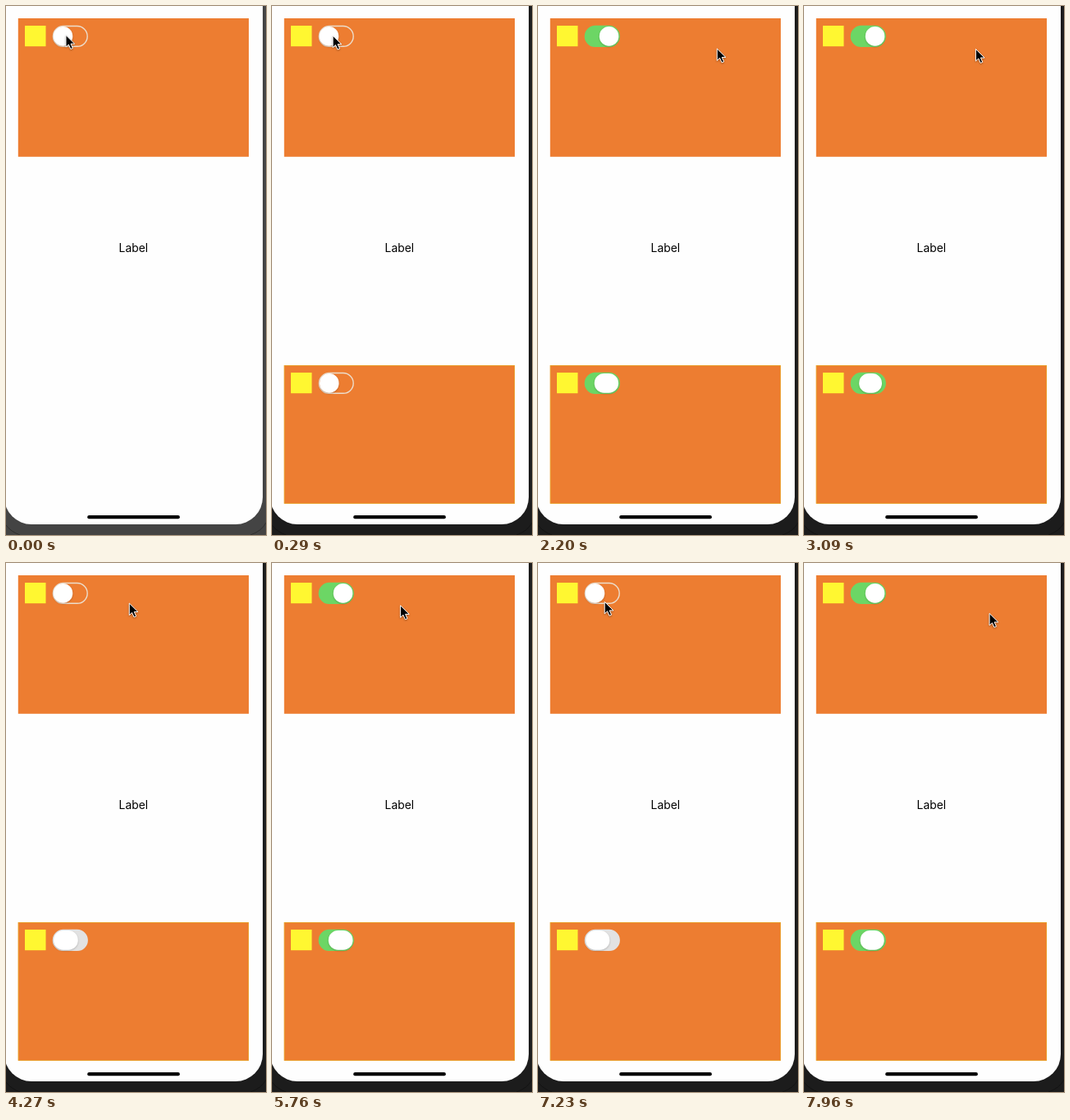
These frames come from a looping animation (317x645 px, 8 s). An HTML page:

```html
<!DOCTYPE html>
<html lang="en">
<head>
<meta charset="utf-8">
<title>Mirrored switch</title>
<style>
  html, body { margin: 0; width: 100%; height: 100%; overflow: hidden; background: #fff; }
  svg { display: block; width: 317px; height: 645px; }
  text { font: 13.9px Inter, sans-serif; text-anchor: middle; }
  .track { stroke-width: 1.4; }
  .thumb { fill: #fff; filter: drop-shadow(0 1px 1px #0003); }
  #cursor { filter: drop-shadow(0 1px 1px #0005); }
</style>
</head>
<body>
<svg viewBox="0 0 317 645">
  <defs>
    <g id="panel">
      <rect x="14.8" y="15" width="281.2" height="168.8" fill="#ed7d31"/>
      <rect x="23" y="24" width="25.5" height="25.2" fill="#fff731"/>
    </g>
  </defs>
  <rect id="bezel" width="317" height="645"/>
  <path d="M0 633Q6 641 17 645M317 630Q312 640 298 645" fill="none" stroke="#0005"/>
  <rect x="-2" y="-60" width="315" height="692" rx="33" fill="#fefefe"/>
  <text x="155.4" y="299.8">Label</text>
  <rect x="99.2" y="621" width="112.7" height="4.3" rx="2.1"/>
  <use href="#panel"/>
  <g id="top">
    <rect class="track" x="57.4" y="24.5" width="41.8" height="24.8" rx="12.4"/>
    <rect class="thumb" y="25.1" height="23.6" rx="11.8"/>
  </g>
  <g id="mirror" transform="translate(0 423)">
    <use href="#panel"/>
    <rect x="15.1" y="15.4" width="280.6" height="168.2" fill="none" stroke="#e8a822" stroke-width=".7"/>
    <rect class="track" x="57.4" y="24.5" width="41.8" height="24.8" rx="12.4"/>
    <rect class="thumb" y="25.1" height="23.6" rx="11.8"/>
  </g>
  <path id="cursor" d="M0 0V14.6L3.4 11.5 5.8 17 8.4 15.9 6 10.6H10.7Z" stroke="#fff"/>
</svg>
<script>
const LOOP = 8000, STEP = 147.4;
const GREEN = [108, 214, 101], GREY = [226, 226, 226];
const ORANGE = [237, 125, 49], OUTLINE = [236, 221, 204];

// Drags to the right: the step of the farthest point and its distance
const swings = [
  [10.2, 9], [14, 176], [21, 133], [31, 111], [36.5, 213], [45, 110], [53.3, 158]
].map(([peak, reach]) => ({ peak, reach }));

// The pointer is back at rest halfway between two peaks
swings.forEach((swing, i) => {
  swing.begin = i ? swings[i - 1].end : 0;
  swing.end = i < swings.length - 1 ? (swing.peak + swings[i + 1].peak) / 2 : 57;
});

// Each drag turns the switch on just before its peak and off before its end
const changes = swings.flatMap(({ peak, end }) => [
  { at: peak - 0.6, on: true }, { at: end - 1.5, on: false }
]);
const initial = { at: -9, on: false };

const $ = selector => document.querySelector(selector);
const clamp = v => Math.max(0, Math.min(1, v));
const mix = (a, b, p) => a + (b - a) * p;
const mixColor = (a, b, p) => `rgb(${a.map((v, i) => Math.round(mix(v, b[i], p)))})`;

function pointerAt(step) {
  const { begin, peak, end, reach } = swings.find(swing => step < swing.end);
  const span = step < peak ? peak - begin : end - peak;
  const offset = reach * (1 + Math.cos(Math.PI * (step - peak) / span)) / 2;
  return [73 + 0.16 * step + offset, 35.5 + 0.24 * step + 0.09 * offset];
}

function paintSwitch(id, { x, width, off, edge, on }) {
  const track = $(id + ' .track'), thumb = $(id + ' .thumb');
  track.setAttribute('fill', mixColor(off, GREEN, on));
  track.setAttribute('stroke', mixColor(edge, GREEN, on));
  thumb.setAttribute('x', x);
  thumb.setAttribute('width', width);
}

function draw(time) {
  const step = Math.floor((time % LOOP + 10) / STEP);
  const change = changes.findLast(({ at }) => at <= step) || initial;
  const age = step - change.at;
  const toward = p => change.on ? p : 1 - p;

  const active = step > 0;
  $('#bezel').setAttribute('fill', active ? '#1c1c1c' : '#444');
  $('#mirror').style.display = active ? '' : 'none';

  const lead = toward(clamp(age * 2.3));
  paintSwitch('#top', {
    x: mix(57.7, 74.8, lead), width: 23.6, off: ORANGE, edge: OUTLINE, on: lead
  });

  // While held, the mirrored thumb is stretched and trails the upper one
  const held = change !== initial;
  paintSwitch('#mirror', {
    x: mix(58, 68.8, toward(1 - Math.exp(-3.1 * age))),
    width: held ? 29.8 - 5 * Math.exp(-1.6 * age) : 23.6,
    off: held ? GREY : ORANGE,
    edge: held ? GREY : OUTLINE,
    on: toward(clamp((age - 0.35) * 4))
  });

  $('#cursor').setAttribute('transform', `translate(${pointerAt(step)})`);
}

const start = performance.now();
function tick() {
  draw(performance.now() - start);
  requestAnimationFrame(tick);
}
tick();
</script>
</body>
</html>
```
